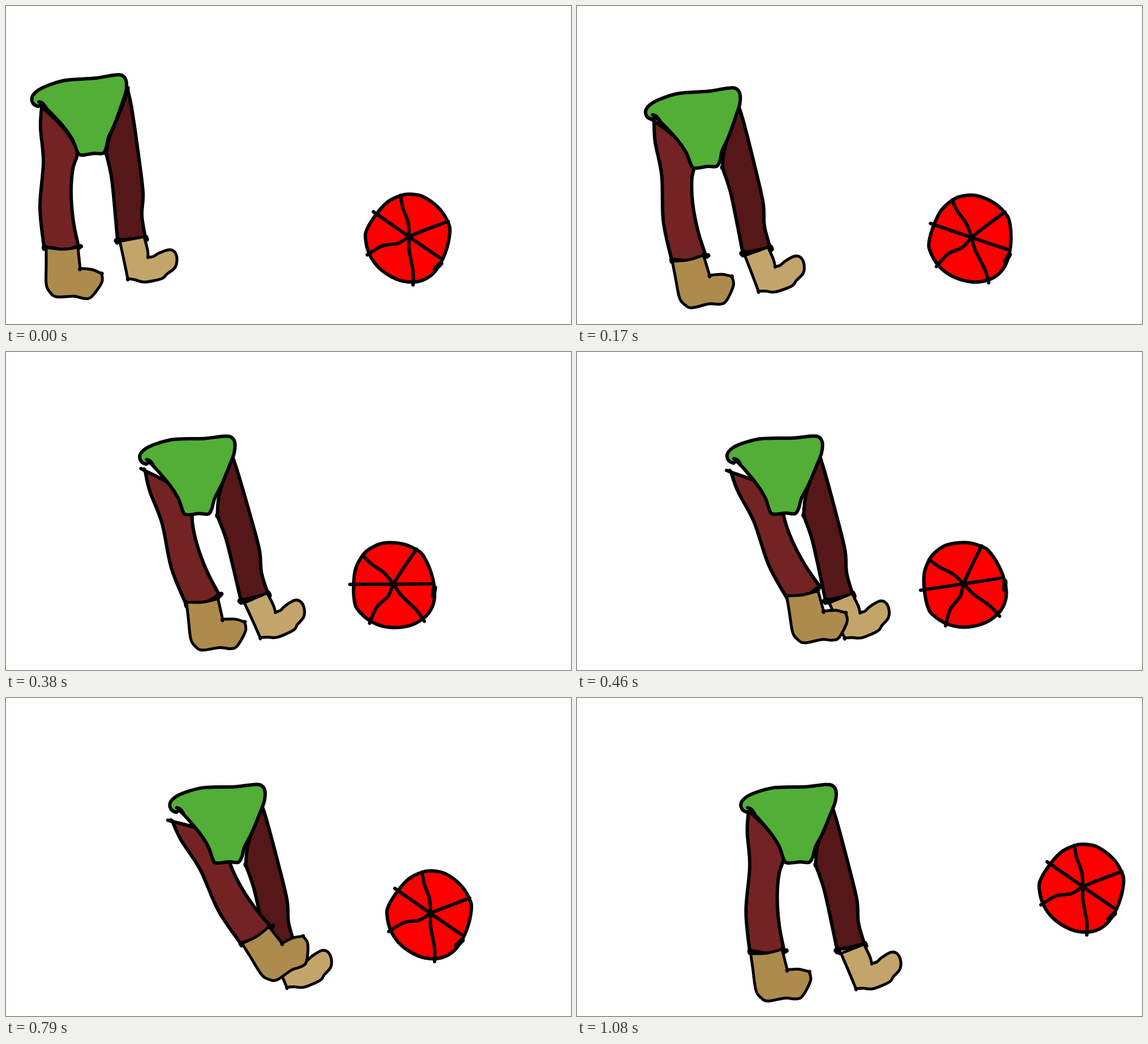
These frames come from a looping animation (998 px wide and 561 px high, 1.33 s). An HTML page:

```html
<!DOCTYPE html>
<html lang="en">
<head>
<meta charset="utf-8">
<title>Kick</title>
<style>
  html, body { margin: 0; width: 100%; height: 100%; overflow: hidden; background: #fff; }
  svg { display: block; width: 100%; height: 100%; }
  path { stroke: #000; stroke-linecap: round; stroke-linejoin: round; }
</style>
</head>
<body>
<svg id="stage" viewBox="0 0 998 561"></svg>
<script>
const LOOP = 1330, FPS = 24, LAST = 26;
const keyTimes = [0, 4, 6, 11, 15, 19, 26];
const stage = document.getElementById('stage');

function add(parent, tag, attrs = {}) {
  const node = document.createElementNS('http://www.w3.org/2000/svg', tag);
  for (const name in attrs) node.setAttribute(name, attrs[name]);
  return parent.appendChild(node);
}

// Smooth path through points; a doubled point makes a corner.
function curve(text, closed) {
  const pts = text.split(' ').map(p => p.split(',').map(Number));
  const n = pts.length;
  const at = i => closed ? pts[(i + n) % n] : pts[Math.max(0, Math.min(n - 1, i))];
  let d = 'M' + pts[0];
  for (let i = 0; i < (closed ? n : n - 1); i++) {
    const [a, b, c, e] = [at(i - 1), at(i), at(i + 1), at(i + 2)];
    const c1 = b.map((v, j) => v + (c[j] - a[j]) / 6);
    const c2 = c.map((v, j) => v - (e[j] - b[j]) / 6);
    d += `C${c1} ${c2} ${c}`;
  }
  return d + (closed ? 'Z' : '');
}

function shape(parent, fill, width, points) {
  add(parent, 'path', { d: curve(points, true), fill, 'stroke-width': width });
}

function line(parent, width, points) {
  add(parent, 'path', { d: curve(points, false), fill: 'none', 'stroke-width': width });
}

// Monotone cubic interpolation over keyTimes.
function track(values) {
  const n = values.length;
  const step = i => keyTimes[i + 1] - keyTimes[i];
  const secant = i => (values[i + 1] - values[i]) / step(i);
  const slopes = values.map((_, i) => {
    if (i === 0) return secant(0);
    if (i === n - 1) return secant(n - 2);
    const a = secant(i - 1), b = secant(i);
    return a * b <= 0 ? 0 : 2 * a * b / (a + b);
  });
  return k => {
    let i = 0;
    while (i < n - 2 && k >= keyTimes[i + 1]) i++;
    const h = step(i), u = (k - keyTimes[i]) / h, v = 1 - u;
    return v * v * (1 + 2 * u) * values[i] + u * u * (3 - 2 * u) * values[i + 1]
      + h * u * v * (v * slopes[i] - u * slopes[i + 1]);
  };
}

const parts = [];

// A group turning about (px, py), moved by the x and y tracks.
function part(parent, px, py, xs, ys, angles) {
  const node = add(parent, 'g');
  parts.push({ node, px, py, x: track(xs), y: track(ys), angle: track(angles) });
  return node;
}

const rightLeg = part(stage, 215, 148,
  [0, 68, 116.5, 209.5, 234, 233, 231],
  [0, 22, 25, 25, 31, 31, 31],
  [0, -6, -9.8, -7, -6.6, -6.8, -6.8]);
shape(rightLeg, '#561718', 6,
  '215,148 215,148 222,180 235,270 242,330 240,370 246,408 246,408 222,411 197,413 197,413 ' +
  '191,345 186,300 177,260 177,260 184,228 204,180');
line(rightLeg, 9, '195,414 200,413');
line(rightLeg, 9, '247,408 248,412');

const rightBoot = part(rightLeg, 201, 415,
  [0, -1, 1, 2, 7, 3, 2],
  [0, 3, 3.5, 3, 2, 3, 5],
  [0, -3, -3.8, -4.6, -5, -4.8, -4.2]);
shape(rightBoot, '#c3a56b', 5,
  '201,415 201,415 208,447 215,481 215,481 228,483 245,487 275,481 284,473 298,462 302,447 ' +
  '298,434 288,430 270,436 260,442 251,443 251,443 250,430 244,407 244,407');

const leftLeg = part(stage, 63, 178,
  [0, 73, 123, 209, 230, 231, 240],
  [0, 25, 29, 34, 53, 40, 21],
  [0, -6.3, -8.7, -23.1, -45, -28.3, 0.5]);
shape(leftLeg, '#732323', 6,
  '63,178 63,178 88,201 110,226 122,246 126,262 118,288 115,330 119,380 128,424 128,424 ' +
  '105,430 84,427 67,424 67,424 60,355 66,275 61,215');
line(leftLeg, 6, '57,172 63,178');
line(leftLeg, 8, '122,427 132,424');

const leftBoot = part(leftLeg, 71, 426,
  [0, -3, -1.5, -3, -6.4, -1.7, -2],
  [0, 1.5, 2, -8.8, -5, -0.3, 4],
  [0, -4.7, -1.3, 14, 3, -3.7, -8.5]);
shape(leftBoot, '#ad8b4d', 5,
  '71,426 71,426 71,455 71,490 77,504 89,513 120,512 138,516 151,513 169,488 169,472 169,472 ' +
  '152,465 131,463 131,463 127,426 127,426 100,429');

const pants = part(stage, 130, 190,
  [0, 75.5, 126.5, 218, 242.5, 242.5, 242.5],
  [0, 23, 26, 23, 28, 28, 28],
  [0, 0, 0.8, 3.2, 2.7, 2.7, 2.8]);
shape(pants, '#52ae37', 6,
  '66,176 57,177 48,172 46,161 55,150 72,141 100,132 130,129 160,127 190,122 204,122 212,131 ' +
  '212,150 205,172 192,208 181,232 177,250 171,260 155,260 133,263 126,257 117,235 100,211');
line(pants, 6, '58,169 64,171 70,178');

const ball = part(stage, 712, 407,
  [0, -15, -23, -29, 17.5, 38, 181.5],
  [0, 1.5, 3, 2, -14, -27, -74],
  [0, -16, -24.2, -43.3, -66, 0, 0]);
shape(ball, '#f00', 6,
  '698,334 714,332 738,337 765,357 780,380 784,400 775,438 758,468 740,482 718,487 690,482 ' +
  '660,463 642,438 635,410 638,393 655,366 675,345');
line(ball, 6, '697,334 701,356 710,381 712,407 712,430 719,468 719,492');
line(ball, 6, '649,363 712,407 766,444');
line(ball, 6, '781,380 738,396 712,407 692,419 665,423 638,439');
line(ball, 9, '758,464 768,454');

function draw(ms) {
  const k = Math.min(LAST, Math.floor((ms + 5) * FPS / 1000));
  for (const { node, px, py, x, y, angle } of parts) {
    node.setAttribute('transform',
      `translate(${px + x(k)} ${py + y(k)}) rotate(${angle(k)}) translate(${-px} ${-py})`);
  }
}

const start = performance.now();
function tick() {
  draw((performance.now() - start) % LOOP);
  requestAnimationFrame(tick);
}
tick();
</script>
</body>
</html>
```
